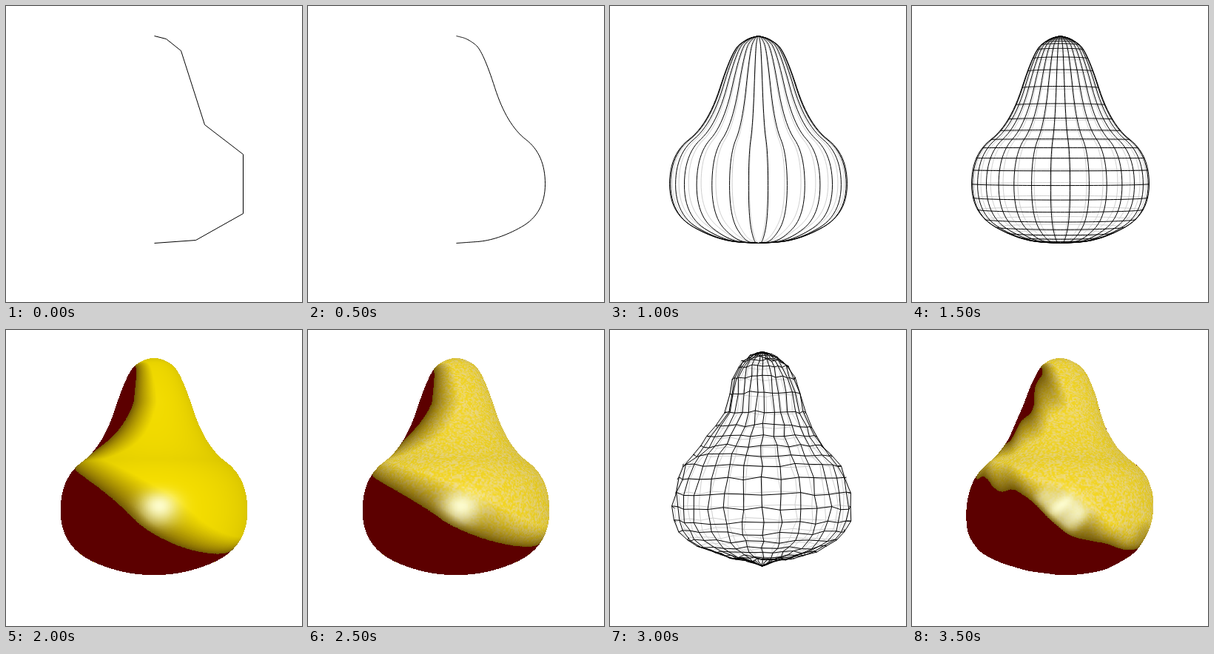
These frames come from a looping animation (400 px wide and 400 px high, 5000 ms). An HTML page with a canvas:

```html
<!DOCTYPE html>
<html lang="en">
<head>
<meta charset="utf-8">
<title>Pear modelling</title>
<style>
  html, body { margin: 0; width: 100%; height: 100%; overflow: hidden; background: #fff; }
  canvas { display: block; width: 400px; height: 400px; }
</style>
</head>
<body>
<canvas id="stage" width="400" height="400"></canvas>
<script>
const SIZE = 400, MID = 200, LOOP = 5000;
const stage = document.getElementById('stage').getContext('2d');

// Half outline, relative to the stage centre
const outline = [[0, -160], [16, -156], [36, -140], [68, -40], [120, 0], [120, 80], [56, 116], [0, 120]];
const SEGS = outline.length;
const lerp = (a, b, t) => a + (b - a) * t;
const clamp = v => Math.max(0, Math.min(1, v));
const mix = (a, b, t) => a.map((v, i) => lerp(v, b[i], t));
const halfway = i => mix(outline[i], outline[i + 1], 0.5);

// Quadratic curve through edge midpoints, straight at both ends; u runs 0..8
function profile(u) {
  const i = Math.min(SEGS - 1, Math.floor(u)), t = u - i;
  if (i === 0) return mix(outline[0], halfway(0), t);
  if (i === SEGS - 1) return mix(halfway(i - 1), outline[i], t);
  const a = halfway(i - 1), b = outline[i], c = halfway(i);
  return mix(mix(a, b, t), mix(b, c, t), t);
}

function hash(x, y, z) {
  let h = Math.imul(x, 374761393) ^ Math.imul(y, 668265263) ^ Math.imul(z, 1274126177);
  h = Math.imul(h ^ (h >>> 13), 1103515245);
  h = Math.imul(h ^ (h >>> 15), 2246822519);
  return ((h ^ (h >>> 16)) >>> 0) / 4294967296;
}

function noise(x, y, z) {
  const ix = Math.floor(x), iy = Math.floor(y), iz = Math.floor(z);
  const fx = x - ix, fy = y - iy, fz = z - iz;
  const row = (j, k) => lerp(hash(ix, iy + j, iz + k), hash(ix + 1, iy + j, iz + k), fx);
  return lerp(lerp(row(0, 0), row(1, 0), fy), lerp(row(0, 1), row(1, 1), fy), fz);
}

function layer() {
  const c = document.createElement('canvas');
  c.width = c.height = SIZE;
  const g = c.getContext('2d');
  g.fillStyle = '#fff';
  g.fillRect(0, 0, SIZE, SIZE);
  g.lineWidth = 1;
  return g;
}

function polyline(g, pts, colour) {
  g.strokeStyle = colour;
  g.beginPath();
  pts.forEach(([x, y]) => g.lineTo(MID + x + 0.5, MID + y + 0.5));
  g.stroke();
}

function drawOutline(pts) {
  const g = layer();
  polyline(g, pts, '#000');
  return g.canvas;
}

// Wireframes
const SPOKES = 30, WIRE_EYE = 2400;

function lathe(u, angle) {
  const [r, y] = profile(u);
  return [r * Math.sin(angle), y, r * Math.cos(angle)];
}

function warp([x, y, z], i, j) {
  const jitter = k => (hash(i, j, k) - 0.5) * 4.5;
  const r = Math.hypot(x, z) || 1;
  const fade = Math.min(1, r / 25);
  const swell = 1 + (y < -40 ? 3 * Math.cos((y + 130) / 12) : 0) * fade / r;
  const lean = 5 + 4 * Math.exp(-(((y + 95) / 40) ** 2)) * (1 + x / r);
  const lift = y < 20 ? -5 - 6 * Math.cos((y + 160) / 21) : -1 - 8 * clamp((y - 60) / 50) * fade;
  return [x * swell + lean + jitter(1) * fade, y + lift + jitter(2) * fade, z * swell];
}

function drawWire({ rings, steps, phase, warped }) {
  const g = layer(), step = 2 * Math.PI / SPOKES, lines = [];
  const vertex = (u, n) => {
    const p = lathe(u, (n + phase) * step);
    return warped ? warp(p, Math.round(u * 4), n % SPOKES) : p;
  };
  for (let n = 0; n < SPOKES; n++) {
    const line = [];
    for (let k = 0; k <= SEGS * steps; k++) line.push(vertex(k / steps, n));
    lines.push(line);
  }
  if (rings) {
    const cuts = warped ? 1 : 4;
    for (let u = 1; u <= SEGS - 1; u += 0.25) {
      for (let n = 0; n < SPOKES; n++) {
        const arc = [];
        for (let k = 0; k <= cuts; k++) arc.push(vertex(u, n + k / cuts));
        lines.push(arc);
      }
    }
  }
  const depth = line => line.reduce((sum, p) => sum + p[2], 0) / line.length;
  const flat = ([x, y, z]) => {
    const s = WIRE_EYE / (WIRE_EYE - z);
    return [x * s, y * s];
  };
  const back = lines.filter(l => depth(l) < -0.01), front = lines.filter(l => depth(l) >= -0.01);
  back.forEach(l => polyline(g, l.map(flat), '#cfcfcf'));
  front.forEach(l => polyline(g, l.map(flat), '#000'));
  return g.canvas;
}

// Shaded solids
const EYE = 400, ROWS = 170, COLS = 800, SPAN = 1.75;
const DARK = [92, 0, 0], BROWN = [108, 82, 4];
const YELLOW = [255, 231, 0], GOLD = [255, 224, 36], CREAM = [250, 228, 132], SHINE = [255, 255, 212];

const dot = (a, b) => a[0] * b[0] + a[1] * b[1] + a[2] * b[2];
const sub = (a, b) => [a[0] - b[0], a[1] - b[1], a[2] - b[2]];
const cross = (a, b) => [a[1] * b[2] - a[2] * b[1], a[2] * b[0] - a[0] * b[2], a[0] * b[1] - a[1] * b[0]];
function unit(a) {
  const l = Math.hypot(a[0], a[1], a[2]) || 1;
  return [a[0] / l, a[1] / l, a[2] / l];
}
const lamp = unit([0.1, -0.15, 0.98]);

function bump(x, y, z) {
  return 2.4 * Math.cos((x + 100) * 0.045) * Math.sin(y * 0.03 - 1)
    + 0.35 * Math.sin(x * 0.13 - y * 0.09 + z * 0.04 + 2)
    + 0.2 * Math.sin(x * 0.17 + y * 0.15 + 4);
}

function solidPoint(r, y, angle, bumpy) {
  const s = Math.sin(angle), c = Math.cos(angle);
  if (!bumpy) return [r * s, y, r * c];
  const d = bump(r * s, y, r * c) * Math.min(1, r / 30);
  return [(r + d) * s, y + d * 0.3, (r + d) * c];
}

function shade(u, angle, { light, speckled, bumpy }) {
  const at = (v, a) => solidPoint(...profile(v), a, bumpy);
  const e = 0.01, v = Math.max(0.05, Math.min(SEGS - 0.05, u));
  const p = at(v, angle);
  // A wide step along the profile softens the creases between its pieces
  const du = sub(at(v + 4 * e, angle), at(v - 4 * e, angle));
  const da = sub(at(v, angle + e), at(v, angle - e));
  const view = unit(sub([0, 0, EYE], p));
  let n = unit(cross(da, du));
  if (dot(n, view) < 0) n = n.map(k => -k);
  const sun = dot(n, light);
  if (sun <= 0) return DARK;
  const facing = clamp(dot(n, view));
  let skin = YELLOW;
  if (speckled) {
    const grain = noise(p[0] / 1.5 + 300, p[1] / 1.5 + 300, p[2] / 1.5 + 300);
    skin = mix(GOLD, CREAM, clamp((grain - 0.3) * 2.2));
  }
  const body = mix(BROWN, skin.map(k => k * (0.84 + 0.13 * facing)), clamp(sun / 0.36) ** 0.75);
  const mirror = n.map((k, i) => 2 * dot(n, lamp) * k - lamp[i]);
  const gloss = clamp(dot(mirror, view)) ** 14;
  return mix(body, SHINE, gloss * clamp(0.3 + sun / 0.12) * 0.95);
}

function drawSolid(look) {
  const g = layer(), img = g.getImageData(0, 0, SIZE, SIZE);
  const near = new Float32Array(SIZE * SIZE).fill(-1e9);
  const owner = new Int32Array(SIZE * SIZE).fill(-1);
  for (let i = 0; i <= SEGS * ROWS; i++) {
    const [r, y] = profile(i / ROWS);
    for (let j = 0; j < COLS; j++) {
      const p = solidPoint(r, y, (j / (COLS - 1) * 2 - 1) * SPAN, look.bumpy);
      const s = EYE / (EYE - p[2]);
      const at = Math.floor(MID + p[1] * s) * SIZE + Math.floor(MID + p[0] * s);
      if (p[2] > near[at]) {
        near[at] = p[2];
        owner[at] = i * COLS + j;
      }
    }
  }
  owner.forEach((id, at) => {
    if (id < 0) return;
    const angle = (id % COLS / (COLS - 1) * 2 - 1) * SPAN;
    img.data.set(shade(Math.floor(id / COLS) / ROWS, angle, look), at * 4);
  });
  g.putImageData(img, 0, 0);
  return g.canvas;
}

const curve = Array.from({ length: SEGS * 16 + 1 }, (_, k) => profile(k / 16));
const highLight = unit([0.566, -0.82, 0.06]);

const scenes = [
  [0, drawOutline(outline)],
  [500, drawOutline(curve)],
  [1000, drawWire({ steps: 12, phase: 0.5 })],
  [1500, drawWire({ steps: 12, phase: 0.5, rings: true })],
  [2000, drawSolid({ light: unit([0.698, -0.708, 0.107]) })],
  [2500, drawSolid({ light: highLight, speckled: true })],
  [3000, drawWire({ steps: 4, phase: 0, rings: true, warped: true })],
  [3500, drawSolid({ light: highLight, speckled: true, bumpy: true })]
];

let start = null, shown = null;
function tick(now) {
  if (start === null) start = now;
  const t = Math.max(0, now - start) % LOOP;
  const picture = scenes.filter(([from]) => from <= t).pop()[1];
  if (picture !== shown) {
    stage.drawImage(picture, 0, 0);
    shown = picture;
  }
  requestAnimationFrame(tick);
}
stage.drawImage(scenes[0][1], 0, 0);
requestAnimationFrame(tick);
</script>
</body>
</html>
```
